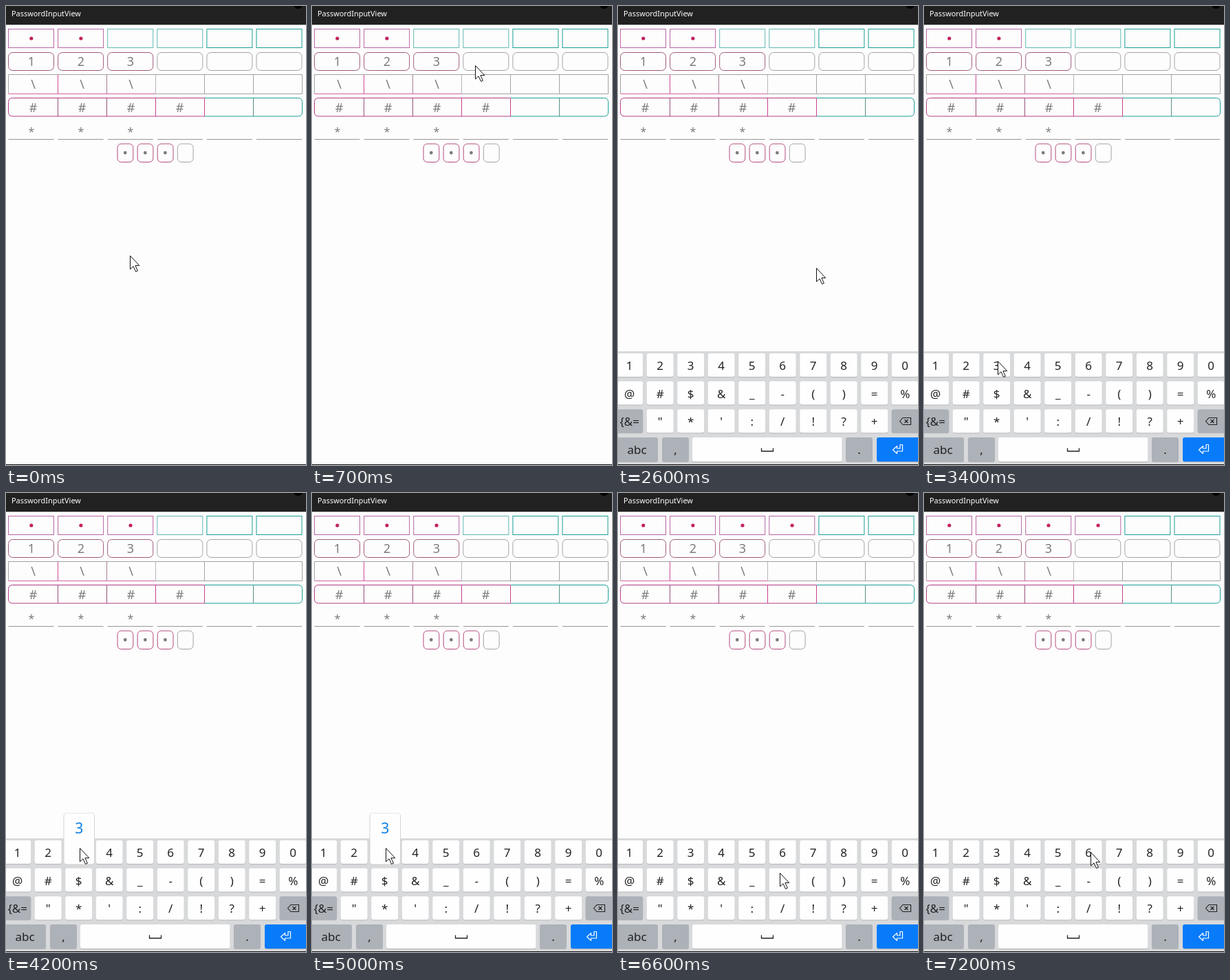
Recreate the animation shown at these times as an HTML page. Size 436 by 666 pixels, loop 8000 ms.

```html
<!DOCTYPE html>
<html lang="en">
<head>
<meta charset="utf-8">
<title>PasswordInputView</title>
<style>
html, body { margin: 0; width: 100%; height: 100%; overflow: hidden; background: #fdfdfd; }
svg { display: block; width: 436px; height: 666px; }
text { font-family: "Noto Sans", "Open Sans", sans-serif; text-anchor: middle; }
</style>
</head>
<body>
<svg id="stage" viewBox="0 0 436 666"></svg>
<script>
const LOOP = 8000, STEP = 100;
const PINK = '#c9408f', TEAL = '#1a9f96', GRAY = '#a3a3a3', INK = '#7c7c7c';
const fieldX = i => 3.5 + 72.1 * i;
const cellX = i => 4 + 71 * i;

const rect = (x, y, w, h, r, attrs) =>
  `<rect x="${x}" y="${y}" width="${w}" height="${h}" rx="${r}" ${attrs}/>`;
const outline = (x, y, w, h, r, color) =>
  rect(x, y, w, h, r, `fill="none" stroke="${color}"`);
const line = (d, color) => `<path d="${d}" fill="none" stroke="${color}"/>`;
const label = (s, x, y, size, color) =>
  `<text x="${x}" y="${y}" font-size="${size}" fill="${color}">${s.replace('&', '&amp;')}</text>`;
const dot = (x, y, r, color) => `<circle cx="${x}" cy="${y}" r="${r}" fill="${color}"/>`;
const each = (n, fn) => Array.from({ length: n }, (_, i) => fn(i)).join('');

function header() {
  return rect(0, 0, 436, 27, 0, 'fill="#212121"') +
    rect(0, 27, 436, 1, 0, 'fill="#c4c4c4"') +
    dot(424.5, -3, 7, '#000') +
    '<text x="8" y="15" font-size="10.9" fill="#fff" style="text-anchor:start">PasswordInputView</text>';
}

function pinField(i) {
  const empty = i < 4 ? '#62b9b3' : TEAL;
  return `<g id="empty${i}">${outline(fieldX(i), 33.5, 66, 27, 0, empty)}</g>` +
    `<g id="full${i}">${outline(fieldX(i), 33.5, 66, 27, 0, '#b866a4')}` +
    dot(fieldX(i) + 33.3, 47, 2.6, '#c2215f') + '</g>';
}

function digitRow() {
  return each(6, i => outline(fieldX(i), 67.5, 66, 26, 6, i < 3 ? '#a05a7e' : GRAY) +
    (i < 3 ? label(String(i + 1), fieldX(i) + 33.3, 87, 18, INK) : ''));
}

function slashRow() {
  return line('M3.5 127V99.5H430.5V127.5H217', GRAY) +
    line('M3.5 127.5H217', '#d263a4') +
    each(5, i => line(`M${cellX(i + 1) + .5} 100V127`, ['#d04d9b', '#a77f98', '#bdb5ba', GRAY, GRAY][i])) +
    each(3, i => label('\\', cellX(i) + 35.5, 120, 18, INK));
}

function hashRow() {
  return line('M288.5 133.5H424.5Q430.5 133.5 430.5 139.5V154Q430.5 160 424.5 160H288.5', TEAL) +
    line('M288.5 133.5H9.5Q3.5 133.5 3.5 139.5V154Q3.5 160 9.5 160H288.5', '#b53c84') +
    each(5, i => line(`M${cellX(i + 1) + .5} 134V160`, ['#96527b', '#96527b', PINK, PINK, '#578f8a'][i])) +
    each(4, i => label('#', cellX(i) + 35.5, 154, 18, INK));
}

function starRow() {
  return each(6, i => line(`M${fieldX(i)} 193.5h66`, '#989898') +
    (i < 3 ? label('*', fieldX(i) + 33.3, 187.5, 16, INK) : ''));
}

function smallRow() {
  return each(4, i => {
    const x = 162 + 29.1 * i;
    return outline(x, 200, 22.8, 26.5, 5.5, i < 3 ? '#b44a7d' : GRAY) +
      (i < 3 ? dot(x + 11.2, 213, 2.4, INK) : '');
  });
}

function key(x, y, w, fill, text = '', h = 34) {
  return rect(x, y + 1, w, h, 3, 'fill="#b4b6b9"') +
    rect(x, y, w, h, 3, `fill="${fill}"`) +
    (text && label(text, Math.max(x, -5) + w / 2, y + 24, 17, '#222'));
}

function keyboard() {
  const dark = '#adb1b8', white = '#fefefe';
  const rows = [
    [...'1234567890'],
    [...'@#$&_-()=%'],
    ['{&=', ...'"*\':/!?+', '']
  ];
  const keys = rows.map((row, r) => row.map((s, i) =>
    key(-2.8 + 44.5 * i, 504 + 40.6 * r, 39, r === 2 && i % 9 === 0 ? dark : white, s)).join('')).join('');
  return rect(0, 501, 436, 164, 0, 'fill="#d8d9db"') + keys +
    key(-3, 626, 61, dark, 'abc', 35) + key(64, 626, 39, dark, ',', 35) +
    key(108, 626, 217.5, white, '', 35) + key(331, 626, 39, dark, '.', 35) +
    key(376, 626, 63, '#087bfa', '', 35) +
    '<path d="M208.5 641.5V646H225.5V641.5" fill="none" stroke="#222" stroke-width="1.3"/>' +
    '<path d="M409.5 602.5L414 597.5H425.5V607.5H414ZM416.5 600L421.5 605M421.5 600L416.5 605" fill="none" stroke="#222" stroke-width="1.1"/>' +
    '<path d="M399.5 644L405.5 638.5V642H410V636.5H413.5V646H405.5V649.5Z" fill="none" stroke="#fff" stroke-width="1.2" stroke-linejoin="round"/>';
}

function popup() {
  return rect(83.5, 464, 45.5, 76, 5, 'fill="#d2d3d5"') +
    rect(84.5, 464.5, 43.5, 74, 4, 'fill="#fefefe"') +
    label('3', 106.2, 494, 21, '#117fe0');
}

const stage = document.getElementById('stage');
stage.innerHTML =
  rect(0, 0, 436, 666, 0, 'fill="#fdfdfd"') + header() +
  each(6, pinField) + digitRow() + slashRow() + hashRow() + starRow() + smallRow() +
  `<g id="keys">${keyboard()}</g><g id="popup">${popup()}</g>` +
  rect(0, 665, 436, 1, 0, 'fill="#111"') +
  '<path id="cursor" d="M.5 .5V20L5 15.8L8.6 23.5L11.4 22.2L7.9 14.6H13.8Z" fill="#fff" stroke="#111"/>';

const show = (id, on) => { document.getElementById(id).style.display = on ? '' : 'none'; };
const cursor = document.getElementById('cursor');

// Pointer stops: time, x, y
const path = [
  [0, 180, 362], [900, 245, 46], [1000, 245, 46], [1500, 288, 380],
  [2800, 288, 380], [3400, 106.5, 515], [5100, 106.5, 515],
  [5700, 240, 65], [5800, 240, 64.5], [6100, 234, 556],
  [6400, 234, 556], [7200, 242, 521], [LOOP, 242, 521]
];

function pointer(t) {
  const i = path.findIndex(p => p[0] > t);
  const [t0, x0, y0] = path[i - 1], [t1, x1, y1] = path[i];
  const u = (t - t0) / (t1 - t0), e = u * u * (3 - 2 * u);
  return [x0 + (x1 - x0) * e, y0 + (y1 - y0) * e];
}

function draw(time) {
  const t = Math.floor(time % LOOP / STEP) * STEP;
  const within = (a, b) => t >= a && t < b;
  const filled = 2 + (t >= 4200) + (t >= 5100);
  for (let i = 0; i < 6; i++) {
    show('full' + i, i < filled);
    show('empty' + i, i >= filled);
  }
  show('keys', t >= 2600);
  show('popup', within(4000, 4300) || within(4900, 5200));
  const [x, y] = pointer(t);
  cursor.setAttribute('transform', `translate(${Math.round(x)} ${Math.round(y)})`);
}

const start = performance.now();
function tick() {
  draw(performance.now() - start);
  requestAnimationFrame(tick);
}
tick();
</script>
</body>
</html>
```
